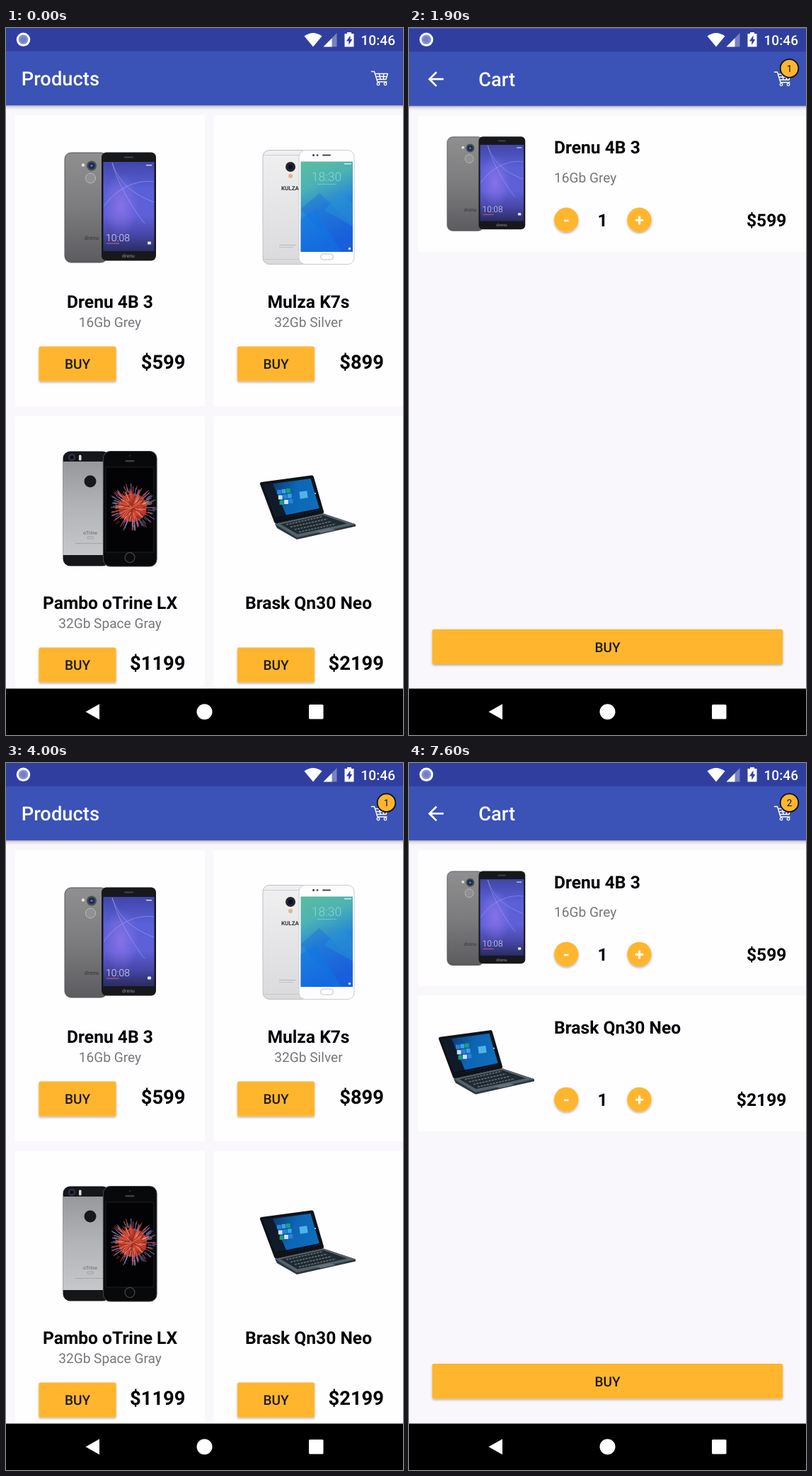
An HTML page that plays this animation: 561x998 px, repeating every 8 s.

```html
<!DOCTYPE html>
<html lang="en">
<head>
<meta charset="utf-8">
<title>Shop</title>
<style>
  html, body { margin: 0; width: 100%; height: 100%; overflow: hidden; background: #000; }
  svg { display: block; width: 561px; height: 998px; }
  text { font-family: Roboto, sans-serif; text-rendering: geometricPrecision; }
</style>
</head>
<body>
<svg id="stage" viewBox="0 0 561 998" xmlns="http://www.w3.org/2000/svg"></svg>
<script>
const LOOP = 8000, STEP = 100;
const AMBER = '#ffb62f';
const stage = document.getElementById('stage');

const rect = (x, y, w, h, fill, rx = 0, extra = '') =>
  `<rect x="${x}" y="${y}" width="${w}" height="${h}" rx="${rx}" fill="${fill}" ${extra}/>`;
const circle = (x, y, r, fill, extra = '') => `<circle cx="${x}" cy="${y}" r="${r}" fill="${fill}" ${extra}/>`;
const path = (d, fill, extra = '') => `<path d="${d}" fill="${fill}" ${extra}/>`;
const line = (d, color, width, extra = '') =>
  path(d, 'none', `stroke="${color}" stroke-width="${width}" ${extra}`);
const text = (s, x, y, size, weight = 400, fill = '#000', anchor = 'start', extra = '') =>
  `<text x="${x}" y="${y}" font-size="${size}" font-weight="${weight}" fill="${fill}" text-anchor="${anchor}" ${extra}>${s}</text>`;
const gradient = (id, stops, dir = 'x2="0" y2="1"') =>
  `<linearGradient id="${id}" ${dir}>` + stops.map(([at, color]) =>
    `<stop offset="${at}" stop-color="${color}"/>`).join('') + '</linearGradient>';
const glow = (id, color, opacity) => `<radialGradient id="${id}"><stop stop-color="${color}" stop-opacity="${opacity}"/>` +
  `<stop offset="1" stop-color="${color}" stop-opacity="0"/></radialGradient>`;

function greyPhone() {
  return rect(83, 176, 60, 155, 'url(#greyBack)', 9, 'stroke="#55565a" stroke-width="1"') +
    circle(109, 193.5, 2.2, '#e6dfd2') +
    circle(121, 194.5, 7, '#4b4e55') + circle(121, 194.5, 4.6, '#1b2b48') + circle(121, 194.5, 1.8, '#5573a0') +
    circle(119.5, 212, 7, '#919191', 'stroke="#bcbcbc" stroke-width="1"') +
    text('drenu', 121, 299, 8, 500, '#3f4044', 'middle') +
    rect(135, 175.5, 77, 153, '#17181c', 7) +
    rect(167, 181.5, 13, 2, '#42444c', 1) +
    rect(137.5, 189, 72, 126, 'url(#violet)') +
    rect(137.5, 205, 50, 90, 'url(#lilac)') +
    line('M150 190C162 226 188 237 209 246M150 190C158 222 184 262 196 276M138 252C158 225 184 214 209 217', '#b6b8ff', .9, 'opacity=".5"') +
    text('10:08', 141, 300.5, 14, 300, '#fff', 'start', 'opacity=".85"') +
    rect(142, 303.5, 18, 1.2, '#c8587d') + rect(200, 301.5, 5, 4, '#e9eaff', 1) +
    rect(198, 193, 8, 1.4, '#d9dbff') +
    text('drenu', 173, 324, 7, 500, '#777a82', 'middle');
}

function silverPhone() {
  return rect(363, 172.5, 64, 161, 'url(#silverBack)', 9, 'stroke="#bfc0c3" stroke-width="1"') +
    line('M364 179.5H420M364 326.5H420', '#c3c4c7', .8) +
    circle(402, 196, 7, '#24262c') + circle(402, 196, 3.2, '#0b1229') +
    circle(402, 209, 3, '#dcb888') +
    text('KULZA', 389, 229, 8, 700, '#35363a') +
    rect(386, 306, 24, 1, '#b7b7ba') + rect(386, 309, 20, 1, '#c2c2c4') +
    rect(414, 172.5, 78, 161, '#fdfdfe', 9, 'stroke="#cbccd0" stroke-width="1"') +
    circle(434.5, 179.5, 1.5, '#33353b') + circle(440, 179.5, 1.3, '#33353b') + rect(447, 178.4, 12, 2.2, '#44464c', 1) +
    rect(416.5, 188.5, 73.5, 127.5, 'url(#ocean)') +
    path('M416.5 256L443 233L490 278V316H470Z', '#1461dd', 'opacity=".35"') +
    path('M416.5 270L438 257L474 316H416.5Z', '#0e78e8', 'opacity=".5"') +
    path('M450 257L472 231L490 248V280Z', '#2795d5', 'opacity=".45"') +
    text('18:30', 453, 216, 17.5, 300, '#d6f6e8', 'middle', 'opacity=".5"') +
    rect(440, 220, 27, 1, '#d6f6e8', 0, 'opacity=".35"') +
    rect(478, 191, 10, 1.4, '#d9f5ec') +
    circle(485.5, 311.5, 1.8, '#c9e3ff') +
    rect(444.5, 319, 18, 8, '#fff', 4, 'stroke="#bfc0c4" stroke-width="1"');
}

function firework() {
  let seed = 7, sparks = '';
  const random = () => (seed = seed * 16807 % 2147483647) / 2147483647;
  const warm = ['#e94b36', '#f06a48', '#d8413c', '#ff9a78'];
  for (let i = 0; i < 210; i++) {
    const angle = random() * Math.PI * 2, end = 12 + random() * 23, start = end - 5 - random() * 9;
    const at = r => `${(179 + Math.cos(angle) * r).toFixed(1)} ${(677 + Math.sin(angle) * r).toFixed(1)}`;
    sparks += line(`M${at(start)}L${at(end)}`, end > 26 && i % 2 ? '#7688cf' : warm[i % 4], .9);
  }
  return circle(179, 677, 20, '#d74832', 'opacity=".7"') + sparks;
}

function blackPhone() {
  return rect(80.5, 597.5, 66, 162, '#15161a', 10) +
    rect(80.5, 612, 60, 132, 'url(#spaceBack)') +
    circle(93, 606, 5.2, '#2c3140') + circle(93, 606, 2.6, '#080c18') +
    rect(103, 602.5, 3.5, 8, '#e2ddd0', 1.6) +
    circle(119, 640, 8.5, '#17181b') +
    text('oTrine', 119, 715, 7, 500, '#77787c', 'middle') +
    rect(115, 718, 8, 3, 'none', .5, 'stroke="#8c8d91" stroke-width=".6"') +
    rect(98, 727, 40, .8, '#9d9ea2') +
    rect(137.5, 597.5, 75.5, 162.5, '#08090b', 10, 'stroke="#3d3e43" stroke-width="1.2"') +
    rect(168.5, 610, 13, 2.4, '#3d3e43', 1.2) + circle(175, 604, 1.1, '#34353b') +
    rect(141, 620, 67.5, 120, '#030305', 0, 'stroke="#25262a" stroke-width=".8"') +
    firework() +
    circle(175, 747.5, 7, '#0b0b0d', 'stroke="#4d4e53" stroke-width="1.1"');
}

function laptop() {
  let keys = '', tiles = '';
  for (let row = 0; row < 4; row++) {
    const x = 396 + row * 6, y = 701 + row * 3.5;
    keys += line(`M${x} ${y}L${x + 52} ${y - 11.5}`, '#66727d', 1.5, 'stroke-dasharray="3 1.4"');
  }
  for (let i = 0; i < 9; i++) {
    const col = i % 3, row = Math.floor(i / 3);
    tiles += rect(383 + col * 6.5 + row * 1.8, 652 + row * 7.5 - col, 5.8, 6,
      ['#2683d9', '#d3e2ee', '#1aa075', '#37a3e8'][i * 3 % 4]);
  }
  return path('M380 700L449 685.500L494 700.500V703.500L411 722L383 706Z', '#2c3740') +
    path('M380 700L449 685.500L494 700.500L411 719Z', '#55626b') +
    path('M388 700.5L448 687.500L482 699.500L412 714.500Z', '#1f2931') + keys +
    path('M437 710.500L457 706L466 708.500L445 713Z', '#65727a') +
    path('M361 641L431.500 631.500Q434 631 434.800 633.500L449 682.500Q449.500 685 447 685.800L382.500 699.500Q380 700 379 697.500L359 644Q358.300 641.500 361 641Z', '#0f1317') +
    path('M363.500 645L430.500 636L443.500 680.500L382.500 693Z', 'url(#desk)') +
    path('M363.500 645L377 643.200L397 690L382.500 693Z', '#101a29') + tiles +
    path('M381.500 690.500L442.800 678L443.500 680.500L382.500 693Z', '#07101f') +
    rect(415, 654, 11, 10, '#62c5f4', 0, 'transform="rotate(-8 420 659)" opacity=".8"') +
    circle(437, 657, 1, '#dfe4e8');
}

const cartIcon =
  line('M516.500 61.500H520.500L525 76H538M521.500 64.500H539.500L537 72.500H524M523 68.500H538M527.500 65L529 72M533.500 65V72', '#fff', 1.4, 'stroke-linejoin="round" stroke-linecap="round"') +
  circle(526, 79, 1.8, 'none', 'stroke="#fff" stroke-width="1.3"') +
  circle(536, 79, 1.8, 'none', 'stroke="#fff" stroke-width="1.3"');

const badge = '<g class="badge">' + circle(537.5, 56.2, 12.8, AMBER, 'stroke="#111" stroke-width="1.8"') +
  text('1', 537.5, 61, 13.6, 400, '#111', 'middle', 'class="count"') + '</g>';

const header = (title, x) =>
  rect(0, 109, 561, 7, 'url(#barShadow)') + rect(0, 0, 561, 109.1, '#3b52b6') + rect(0, 0, 561, 32.7, '#303f9f') +
  text(title, x, 81.2, 27.3, 500, '#fff') + cartIcon + badge;

const button = (x, y, w, id = '') => `<g ${id && `id="${id}"`} filter="url(#low)">` + rect(x, y, w, 49.2, AMBER, 2.7) + '</g>' +
  text('BUY', x + w / 2, y + 32, 19.1, 500, '#1d1a14', 'middle');

function product({ name, detail, price, art, col, row, id }) {
  const x = col * 280.5, y = row * 425;
  return rect(13 + x, 123 + y, 268, 411, '#fefdff') + `<use href="#${art}"/>` +
    text(name, 147 + x, 394.5 + y, 24.6, 700, '#000', 'middle') +
    text(detail, 147 + x, 422 + y, 19.1, 400, '#77767a', 'middle') +
    button(46.4 + x, 449.4 + y, 109.2, id) +
    text(price, 253.4 + x, 481.4 + y, 27.3, 700, '#000', 'end');
}

function cartRow({ name, detail, price, art }, y, fit) {
  const round = (x, sign) => circle(x, 270 + y, 17.2, AMBER, 'filter="url(#low)"') +
    text(sign, x, 278 + y, 23, 700, '#fff', 'middle');
  return rect(13, 123 + y, 548, 192, '#fefdff') + `<use href="#${art}" transform="${fit}"/>` +
    text(name, 205, 176.5 + y, 24.6, 700) + text(detail, 205, 217.3 + y, 19.1, 400, '#77767a') +
    round(222.3, '-') + text('1', 273.5, 279.3 + y, 24.6, 700, '#000', 'middle') + round(325.5, '+') +
    text(price, 533.4, 279.3 + y, 24.6, 700, '#000', 'end');
}

const items = [
  { name: 'Drenu 4B 3', detail: '16Gb Grey', price: '$599', art: 'greyPhone', col: 0, row: 0, id: 'firstBuy' },
  { name: 'Mulza K7s', detail: '32Gb Silver', price: '$899', art: 'silverPhone', col: 1, row: 0 },
  { name: 'Pambo oTrine LX', detail: '32Gb Space Gray', price: '$1199', art: 'blackPhone', col: 0, row: 1 },
  { name: 'Brask Qn30 Neo', detail: '', price: '$2199', art: 'laptop', col: 1, row: 1, id: 'lastBuy' }
];

const shadow = (id, dy, blur, opacity) =>
  `<filter id="${id}" x="-20%" y="-20%" width="140%" height="150%"><feDropShadow dx="0" dy="${dy}" stdDeviation="${blur}" flood-color="#000" flood-opacity="${opacity}"/></filter>`;

const defs = '<defs>' + shadow('low', 1.8, 1.4, .3) + shadow('high', 3, 2.1, .34) +
  gradient('barShadow', [[0, '#00000055'], [.4, '#00000018'], [1, '#00000000']]) +
  gradient('greyBack', [[0, '#8f8f90'], [.5, '#7c7c7e'], [1, '#5c5c60']]) +
  gradient('violet', [[0, '#4046a8'], [.3, '#5a60d6'], [.6, '#5f60d8'], [.82, '#4646a6'], [1, '#292c62']]) +
  glow('lilac', '#9a78ee', .7) +
  gradient('silverBack', [[0, '#f0f0f1'], [.5, '#e5e5e7'], [1, '#dadadc']]) +
  gradient('ocean', [[0, '#5cbd9c'], [.3, '#4cb2b4'], [.6, '#2585d6'], [1, '#1c5cd8']], 'x2=".25" y2="1"') +
  gradient('spaceBack', [[0, '#97989b'], [.5, '#b3b4b7'], [1, '#c6c7c9']]) +
  gradient('desk', [[0, '#0b2b57'], [.6, '#0d65b5'], [1, '#0f6dba']], 'x2="1" y2=".3"') +
  Object.entries({ greyPhone, silverPhone, blackPhone, laptop })
    .map(([id, draw]) => `<g id="${id}">${draw()}</g>`).join('') + '</defs>';

const page = rect(0, 0, 561, 998, '#f9f7fb');

const products = page + items.map(product).join('') + header('Products', 21.8);

const cart = page + cartRow(items[0], 0, 'translate(-17 2.5) scale(.855)') +
  `<g id="secondRow">${cartRow(items[3], 205, 'translate(-317 -254.3)')}</g>` +
  button(32.8, 848, 495.4) + header('Cart', 98.2) +
  path('M20 11H7.830l5.590-5.590L12 4l-8 8 8 8 1.410-1.410L7.830 13H20v-2z', '#fff', 'transform="translate(21.5 55) scale(1.365)"');

const statusIcons =
  circle(24.5, 16.3, 9.7, '#fff') + circle(24.5, 16.3, 6.8, '#8792cf') + circle(24.5, 16.3, 4.2, '#7380c8') +
  path('M421.500 11.500Q434 2.500 446.500 11.500L434 26.500Z', '#fff') +
  path('M448.500 26.500H467.500V7Z', '#fff', 'opacity=".35"') + path('M448.500 26.500H460.500V14.500Z', '#fff') +
  path('M482 8V6H488V8H491.500V26.500H478.500V8Z', '#fff') + path('M486.500 10.500L481 18.500H484.300V24L489.300 16H486.500Z', '#303f9f') +
  text('10:46', 550, 23.5, 19.1, 500, '#fff', 'end');

const navBar = rect(0, 932.5, 561, 65.5, '#000') +
  rect(98, 932.5, 49, 65.5, '#343434', 24, 'id="ripple"') +
  path('M112.500 965.300L132 954.300V976.300Z', '#fff') +
  circle(280.5, 965.3, 11, '#fff') + rect(428, 955, 20.5, 20.5, '#fff', 1.5);

stage.innerHTML = defs + products + `<g id="cart">${cart}</g>` + statusIcons + navBar;

const byId = id => document.getElementById(id);
const cartView = byId('cart'), secondRow = byId('secondRow'), ripple = byId('ripple');
const badges = stage.querySelectorAll('.badge'), counts = stage.querySelectorAll('.count');
const clamp = v => Math.max(0, Math.min(1, v));
const between = (t, from, to) => t >= from && t < to;
const show = (el, on) => el.setAttribute('visibility', on ? 'visible' : 'hidden');
const lift = (id, on) => byId(id).setAttribute('filter', `url(#${on ? 'high' : 'low'})`);

function render(t) {
  const closing = clamp((t - 3550) / 250);
  const first = between(t, 1900, 3800), second = t >= 7400;
  const settling = between(t, 1900, 2100) || between(t, 7400, 7600);
  const offset = settling ? .8 : first ? 80 * closing ** 4 : 0;
  const opacity = first ? 1 - clamp((t - 3650) / 150) : second ? 1 : 0;
  cartView.setAttribute('transform', `translate(0 ${offset.toFixed(2)})`);
  cartView.setAttribute('opacity', opacity.toFixed(3));
  show(cartView, first || second);
  secondRow.setAttribute('display', second ? 'inline' : 'none');

  ripple.setAttribute('opacity', between(t, 3300, 4000) ? 1 - clamp((t - 3400) / 450) : 0);
  lift('firstBuy', between(t, 500, 1600));
  lift('lastBuy', between(t, 6700, 7100));

  badges.forEach(el => el.setAttribute('display', t >= 700 ? 'inline' : 'none'));
  counts.forEach(el => { el.textContent = t >= 6500 ? '2' : '1'; });
}

const start = performance.now();
function frame() {
  const t = (performance.now() - start) % LOOP;
  render(Math.floor(t / STEP) * STEP);
  requestAnimationFrame(frame);
}
frame();
</script>
</body>
</html>
```
